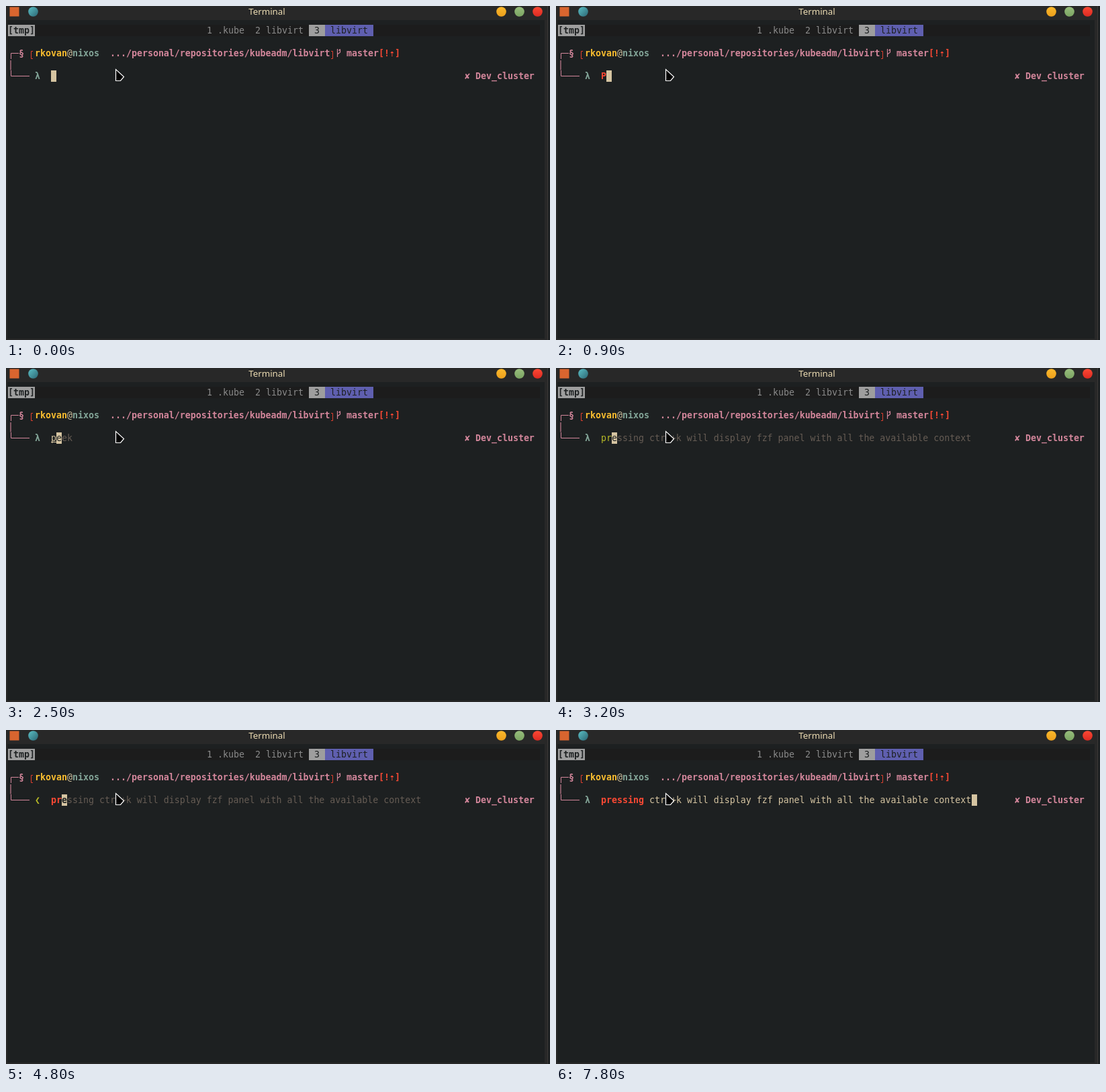
Write an HTML page that moves like this. It is 810 px wide and 498 px high and loops after 8000 ms.

```html
<!DOCTYPE html>
<html lang="en">
<head>
<meta charset="utf-8">
<title>Terminal</title>
<style>
  html, body { margin: 0; width: 100%; height: 100%; overflow: hidden; background: #1d2021; }
  svg { display: block; width: 810px; height: 498px; }
  .mono { font: 13.288px "DejaVu Sans Mono", monospace; white-space: pre; }
  .bold { font-weight: 700; }
  .title { font: 13.333px "Noto Sans", sans-serif; }
</style>
</head>
<body>
<svg id="stage" viewBox="0 0 810 498" xmlns="http://www.w3.org/2000/svg">
  <defs>
    <linearGradient id="yellow" x2="0" y2="1"><stop stop-color="#fcb92c"/><stop offset="1" stop-color="#eda01c"/></linearGradient>
    <linearGradient id="green" x2="0" y2="1"><stop stop-color="#98bd7c"/><stop offset="1" stop-color="#7ba562"/></linearGradient>
    <linearGradient id="red" x2="0" y2="1"><stop stop-color="#fb4934"/><stop offset="1" stop-color="#dc2a22"/></linearGradient>
    <linearGradient id="teal" x2="1" y2="1"><stop stop-color="#5cc0c6"/><stop offset="1" stop-color="#2b6673"/></linearGradient>
  </defs>

  <!-- window -->
  <rect width="810" height="498" fill="#282828"/>
  <rect x="2" y="21" width="800" height="475" fill="#1d2021"/>
  <rect x="806" y="0" width="1" height="498" fill="#3c3836"/>
  <rect x="807" y="0" width="3" height="498" fill="#1d2021"/>
  <rect x="5.5" y="1.5" width="14" height="14" fill="#d9652f"/>
  <circle cx="40.5" cy="8.5" r="7.3" fill="url(#teal)"/>
  <circle cx="737.5" cy="8.5" r="7.3" fill="url(#yellow)"/>
  <circle cx="764.5" cy="8.5" r="7.3" fill="url(#green)"/>
  <circle cx="791.5" cy="8.5" r="7.3" fill="url(#red)"/>
  <text class="title" x="388.5" y="13" text-anchor="middle" fill="#ebdbb2">Terminal</text>

  <!-- status bar -->
  <rect x="3" y="28" width="792" height="17" fill="#1c1c1c"/>
  <rect x="3" y="28" width="40" height="17" fill="#9e9e9e"/>
  <rect x="451" y="28" width="24" height="17" fill="#9e9e9e"/>
  <rect x="475" y="28" width="72" height="17" fill="#5f5faf"/>

  <!-- prompt lines -->
  <g fill="none" stroke-width="1">
    <path d="M7.5 79V70.5H19M7.5 96V104.5H35" stroke="#d3869b"/>
    <path d="M40 67.5H37.5V78.5H40M484 67.5H486.5V78.5H484" stroke="#e0402f"/>
    <path d="M493.5 64V76M493.5 72L497.5 69V64.5M495.5 66.5L497.5 64.5" stroke="#d3869b" stroke-width="1.2"/>
  </g>
  <g id="fixed"></g>
  <g id="live"></g>
  <path id="arrow" d="M163.5 94.5V111.5H170.5L175.5 105.5Z" fill="#000" stroke="#fff" stroke-width="1.2"/>
  <path id="beam" d="M160 86.5H166M163 86.5V101.5M160 101.5H166" fill="none" stroke="#fff" stroke-width="1.2"/>
</svg>
<script>
const LOOP = 8000, CELL = 8, LEFT = 3, INPUT = 8;
const C = {
  dark: "#1d2021", tab: "#8a8a8a", sand: "#d5c4a1", faint: "#665c54", pink: "#d3869b",
  red: "#fb4934", yellow: "#fabd2f", lime: "#b8bb26", blue: "#83a598"
};
const byId = id => document.getElementById(id);
const fixed = byId("fixed"), live = byId("live"), arrow = byId("arrow"), beam = byId("beam");

function add(parent, tag, attrs, content = "") {
  const el = document.createElementNS("http://www.w3.org/2000/svg", tag);
  for (const key in attrs) el.setAttribute(key, attrs[key]);
  el.textContent = content;
  parent.append(el);
}

const colX = col => LEFT + CELL * col;

// Row 0 is the status bar; the input line is row 4.
function put(parent, col, row, str, fill, bold) {
  if (!str) return;
  add(parent, "text", { class: bold ? "mono bold" : "mono", x: colX(col), y: 41 + 17 * row, fill }, str);
}

[
  [0, 0, "[tmp]", C.dark, true],
  [37, 0, "1", C.tab], [39, 0, ".kube", C.tab],
  [46, 0, "2", C.tab], [48, 0, "libvirt", C.tab],
  [57, 0, "3", C.dark], [60, 0, "libvirt", C.dark],
  [2, 2, "§", C.pink, true],
  [5, 2, "rkovan", C.yellow, true], [11, 2, "@", C.sand], [12, 2, "nixos", C.blue, true],
  [19, 2, ".../personal/repositories/kubeadm/libvirt", C.pink, true],
  [63, 2, "master", C.pink, true], [69, 2, "[!⇡]", C.red, true],
  [0, 3, "|", C.pink],
  [85, 4, "✘", C.pink, true], [87, 4, "Dev_cluster", C.pink, true]
].forEach(item => put(fixed, ...item));

const LINE = "pressing ctrl+k will display fzf panel with all the available context";

// line: all text, word: highlighted length, typed: entered length, cursor: its column
const steps = [
  { at: 0, line: "", word: 0, typed: 0, cursor: 0 },
  { at: 700, line: "", word: 0, typed: 0, cursor: 0, beam: true },
  { at: 800, line: "", word: 0, typed: 0, cursor: 0 },
  { at: 900, line: "P", word: 1, typed: 1, cursor: 1, color: C.red, bold: true },
  { at: 2300, line: "", word: 0, typed: 0, cursor: 0 },
  { at: 2500, line: "peek", word: 1, typed: 1, cursor: 1, color: C.sand, underline: true },
  { at: 3200, line: LINE, word: 2, typed: 2, cursor: 2, color: C.lime },
  { at: 3300, line: LINE, word: 3, typed: 3, cursor: 3, color: C.red, bold: true },
  { at: 4800, line: LINE, word: 3, typed: 3, cursor: 2, color: C.red, bold: true, command: true },
  { at: 4900, line: LINE, word: 8, typed: LINE.length, cursor: LINE.length, color: C.red, bold: true, command: true },
  { at: 7800, line: LINE, word: 8, typed: LINE.length, cursor: LINE.length, color: C.red, bold: true }
];

function draw(s) {
  live.replaceChildren();
  put(live, 5, 4, s.command ? "❮" : "λ", s.command ? C.lime : C.blue, true);
  const span = (from, to, fill, bold) => put(live, INPUT + from, 4, s.line.slice(from, to), fill, bold);
  // Leave the cell under the cursor to the cursor itself.
  const part = (from, to, fill, bold) => {
    if (s.cursor < from || s.cursor >= to) return span(from, to, fill, bold);
    span(from, s.cursor, fill, bold);
    span(s.cursor + 1, to, fill, bold);
  };
  part(0, s.word, s.color, s.bold);
  part(s.word, s.typed, C.sand);
  part(s.typed, s.line.length, C.faint);
  if (s.underline) add(live, "rect", { x: colX(INPUT), y: 110, width: CELL, height: 1, fill: s.color });
  add(live, "rect", { x: colX(INPUT + s.cursor), y: 96, width: CELL, height: 17, fill: C.sand });
  span(s.cursor, s.cursor + 1, C.dark, s.bold && s.cursor < s.word);
  arrow.style.display = s.beam ? "none" : "";
  beam.style.display = s.beam ? "" : "none";
}

let shown;
const start = performance.now();
function tick() {
  const t = (performance.now() - start) % LOOP;
  const step = steps.findLast(s => s.at <= t);
  if (step !== shown) draw(shown = step);
  requestAnimationFrame(tick);
}
tick();
</script>
</body>
</html>
```
